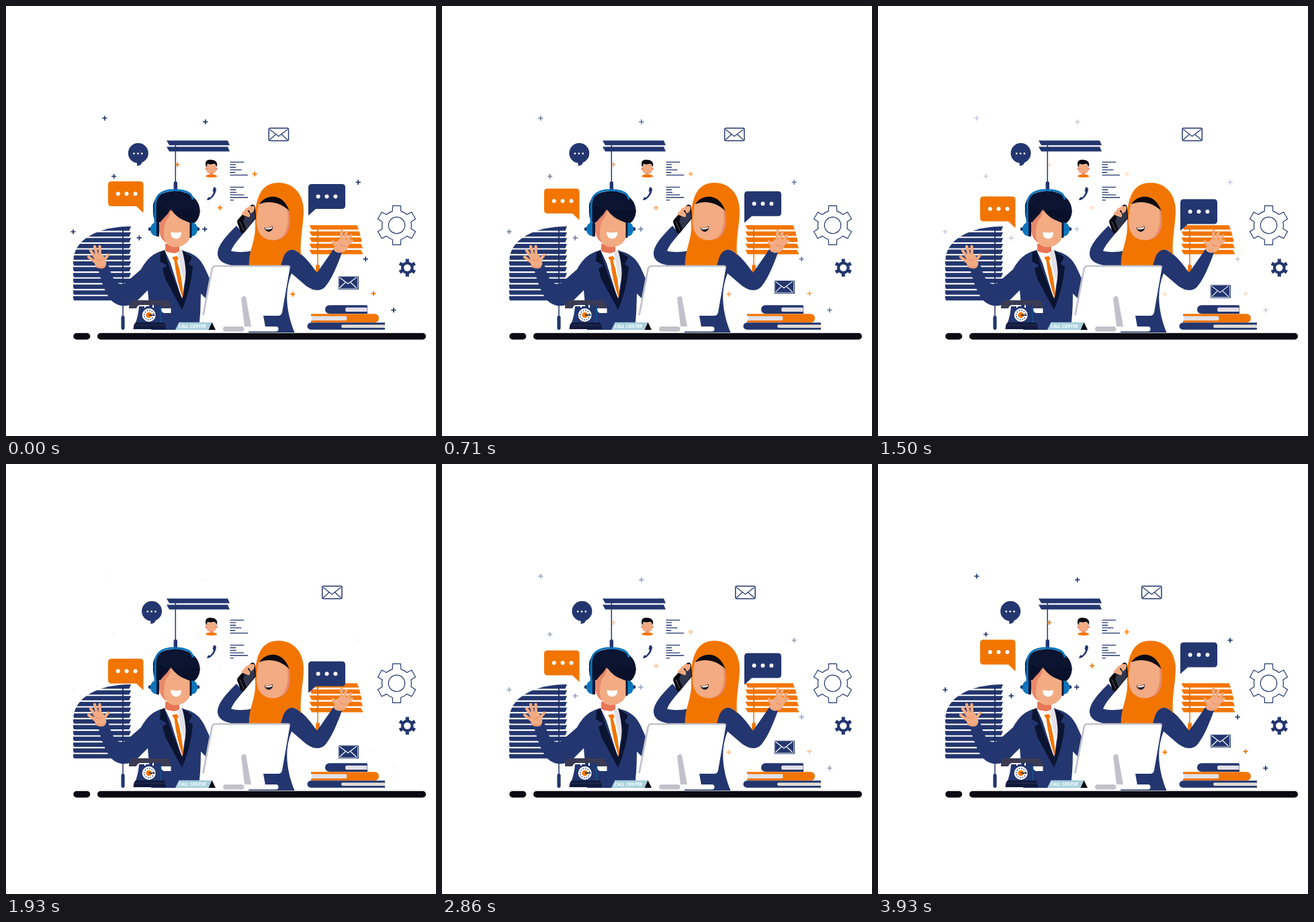
Write an HTML page that moves like this. It is 640x640 px and loops after 4 s.

```html
<!DOCTYPE html>
<html lang="en">
<head>
<meta charset="utf-8">
<title>Call center</title>
<style>
  html, body { margin: 0; width: 100%; height: 100%; overflow: hidden; background: #fff; }
  svg { display: block; width: 100vw; height: 100vh; }
  .navy { fill: #23366f; }
  .orange { fill: #f27501; }
  .skin { fill: #f2ab82; }
  .shade { fill: #e8886b; }
  .dark { fill: #0b1430; }
  .black { fill: #0b0911; }
  .blue { fill: #0c75bc; }
  .grey { fill: #c2c1cb; }
  .page { fill: #e2e0e8; }
  .white { fill: #fff; }
  .line { fill: none; stroke: #23366f; stroke-linecap: round; stroke-linejoin: round; }
  .finger { fill: none; stroke: #f2ab82; stroke-width: 4.4; stroke-linecap: round; stroke-linejoin: round; }
  .sign { font: italic 700 7px "Open Sans", sans-serif; fill: #fff; letter-spacing: -.15px; }
</style>
</head>
<body>
<svg viewBox="0 0 640 640">
  <defs>
    <clipPath id="arch"><path d="M187 328C139 328 100 346 100 381V439H187Z"/></clipPath>
    <clipPath id="curve"><path d="M450 325H522Q531 345 531 370H450Z"/></clipPath>
  </defs>

  <!-- blinds -->
  <g class="navy">
    <path id="left-blind" clip-path="url(#arch)"/>
    <path d="M239 200.3H330L333 207.3H243ZM239 209.5H330L333 216.5H243Z"/>
    <rect x="249.6" y="261" width="5.4" height="18" rx="2.6"/>
    <rect x="171.4" y="461" width="5.2" height="21" rx="2.4"/>
  </g>
  <path d="M174 330V463M252.3 207V264" class="line" stroke-width="1.5"/>
  <path d="M174 330V438" stroke="#192856"/>
  <path id="right-blind" class="orange" clip-path="url(#curve)"/>
  <path d="M464 332V388" stroke="#f27501" stroke-width="1.5"/>
  <path d="M464 332V369" stroke="#d96800"/>
  <rect x="461.2" y="385" width="5.8" height="13" rx="2.4" class="orange"/>

  <!-- contact card -->
  <path class="skin" d="M298 236H313V243C313 248 309 250 305.500 250S298 248 298 243Z"/>
  <circle cx="298" cy="242.500" r="1.500" class="shade"/><circle cx="313.300" cy="242.500" r="1.500" class="shade"/>
  <path class="shade" d="M303 249H308V253H303Z"/>
  <path class="orange" d="M297 254Q298 251 302.500 250.700Q305.500 253 308.500 250.700Q313 251 314.500 254Q306 256.500 297 254Z"/>
  <path class="black" d="M298 240C295 231 299 228 306 229C312 229 316 233 313.500 240Q313 236 310 235Q303 236.500 300 235Q299 237 298 240Z"/>
  <path class="navy" d="M309 270Q312 269 313 273Q312 281 305 287Q301 290 299 288.500L301 284.500L304 285Q308 281 309 277L307.500 275Z"/>
  <path id="list" class="line" stroke-width="1.35" style="stroke-linecap:butt"/>

  <!-- gears -->
  <path id="big-gear" class="line" stroke-width="1.2"/>
  <circle cx="581.500" cy="326.400" r="12.200" class="line" stroke-width="1.2"/>
  <path id="small-gear" class="navy"/>
  <circle cx="597.300" cy="389.600" r="5.200" class="white"/>

  <!-- drifting icons -->
  <g id="mail" class="line" stroke-width="1.5">
    <rect x="391.200" y="181.800" width="29.300" height="18.600" rx="2"/>
    <path stroke-width="1.2" d="M393 184L405.800 194L418.600 184M393 198.800L401.500 191M418.600 198.800L410 191"/>
  </g>
  <g id="chat">
    <circle cx="196.800" cy="219" r="15" class="navy"/>
    <path class="navy" d="M195 231V238Q203 237.500 203 229Z"/>
    <path d="M190.500 219.600h0M196.400 219.600h0M202.200 219.600h0" stroke="#fff" stroke-width="2.8" stroke-linecap="round"/>
  </g>
  <g id="boxes">
    <path class="orange" d="M157 261H199.500Q204.500 261 204.500 266V308L194 298H157Q152 298 152 293V266Q152 261 157 261Z"/>
    <path class="navy" d="M455 265H500Q505 265 505 270V297Q505 302 500 302H461L450 312V270Q450 265 455 265Z"/>
    <path d="M166.800 279.500h0M179.500 279.500h0M192.500 279.500h0M464.600 283.500h0M477.500 283.500h0M490.400 283.500h0" stroke="#fff" stroke-width="6" stroke-linecap="round"/>
  </g>
  <g id="note">
    <rect x="494.600" y="402" width="30.400" height="20" rx="1.500" class="navy"/>
    <rect x="495" y="402.300" width="28.500" height="18.400" rx="1.500" fill="none" stroke="#fff" stroke-width=".8"/>
    <path d="M496.500 404L509 413.500L521.500 404M496.500 419.500L505 411.500M521.500 419.500L513 411.500" fill="none" stroke="#fff" stroke-width="1.2"/>
  </g>

  <!-- woman -->
  <path class="navy" d="M343 327C330 340 314 356 315 370C316 380 325 384 340 387H372L365 364.500C355 366.500 344 367 335 364.500C338 356 347 346 353 339Z"/>
  <path class="navy" d="M405 384C410 368 416 362 424 362C437 363 451 380 463 397L488 361L500 367C494 384 484 409 474 419C466 426 455 423 446 416L425 398C414 425 417 455 429.500 486H361V470L390 400Z"/>
  <path class="orange" d="M405 263C430 263 443 282 443 305C443 325 437 347 439 371C433 362 424 360 417 367C411 373 412 381 408 388H362C360 366 372 350 371 325C370 300 373 263 405 263Z"/>
  <path class="shade" d="M376 295C390 285 410 290 421 303C426 325 422 347 400 348.500C381 348 372 336 373 315Z"/>
  <path class="skin" d="M376 295C390 286 410 290 418.500 302C422 325 418 348 397 348.500C380 348 372 336 373 315Z"/>
  <path class="black" d="M377 295C387 279 413 278 421.500 305C411 294 393 288 377 295Z"/>
  <path class="black" d="M384.500 329.500Q391 331.500 396.500 327.500Q398 335 391.500 336Q386 336 384.500 329.500Z"/>
  <path class="white" d="M385.500 329.900Q391 331.500 396 328.500L396 331Q391 333.500 386.300 332Z"/>
  <path class="black" d="M346 317L365 296Q369 294 371 299L372 316L354 338Q351 340 349 336L344 322Q343.500 319 346 317Z"/>
  <path fill="#30364e" d="M355 314L369 302L371 315L358 333L353 320Z"/>
  <path d="M348 321L354 334" stroke="#596078"/>
  <path class="finger" d="M353 309L357 305L361 310M358 303L363 301L365 306M363 300L368 300L367 304M355 310L361 312"/>
  <path class="skin" d="M490 357Q493 346 500 346Q510 347 510 355Q508 365 500 367Q490 369 487 361Z"/>
  <path class="finger" d="M499 350L499.500 335M503 350L506.500 337M506 353L513 342M507 356L514.500 349.500M492 358L486.500 350.500"/>
  <path d="M497 354Q500 359 506 357M493 364Q497 367 500 366" fill="none" stroke="#e8886b"/>

  <!-- man -->
  <path class="navy" d="M235 364C216 368 208 380 201 392L178 412C167 417 162 410 157 400L152 384L137 391C142 411 149 432 160 441C170 449 186 447 194 440L211 423L216 482H287Q290 455 290 428L298 436L306 412L295 388C288 375 280 368 262 364Z"/>
  <path class="skin" d="M131 373Q137 366 144 370L149 379Q150 387 146 390Q138 392 133 388Z"/>
  <path class="finger" d="M134 382L123 373.500M134 376L126 364M136 373L132 358M140 373L139.500 358M146 378L152 370.500"/>
  <path d="M132 386Q139 392 147 387M134 377Q140 381 144 376" fill="none" stroke="#e8886b"/>

  <path class="white" d="M236 363H264L269 390L262 437L245 383Z"/>
  <path class="page" d="M256 368L262 362Q270 381 266 412L260 390Z"/>
  <path fill="#e77657" d="M237 354H258V365Q249 371 237 365Z"/>
  <path class="white" d="M236 364Q240 367 248 367.500L251 371L244 378Z"/>
  <path class="orange" d="M247 374L254 372L257 376L254.500 379Q263 405 264 437Q254 411 250.500 379Z"/>
  <path class="dark" d="M230 366L236 363Q241 388 262.500 436L262 452L237 406L233 391L240 386L229 380Z"/>
  <path class="dark" d="M262 363L277 374L272 384L278 388Q275 422 262 452L262.500 436Q273 401 262 363Z"/>

  <path class="dark" d="M219 302C217 285 233 275 253 275.500C275 276 290 290 288.500 307C287 318 281 324 276 324V344H272L230 322L222 321Q218 312 219 302Z"/>
  <path class="shade" d="M228 324L245 302L262 340L243 354C231 351 228 340 228 331Z"/>
  <path class="skin" d="M234 324Q242 317 246 303Q255 318 275.500 322V336C275 352 263 359 251 359C239 358 234 348 234 335Z"/>
  <path class="dark" d="M245 302Q257 318 279 324Q289 316 288.500 304Q285 290 270 288L240 287Q235 300 238 317Z"/>
  <path class="shade" d="M228 330Q229 320 239 311L245 303Q246 312 238 320Q234 331 235 348Q228 342 228 330Z"/>
  <path fill="#060b20" d="M226 297Q246 309 262 303Q279 301 288 307Q286 321 278 324Q257 318 245 302Q240 314 228 322Z" opacity=".4"/>
  <path class="white" d="M245 336.500Q253 338 261 336.500Q261 346.500 253 346.500Q245.500 346 245 336.500Z"/>
  <path d="M222 326V297C222 281 233 274 250 274C266 274 277 278 278 288" fill="none" stroke="#0c75bc" stroke-width="3"/>
  <circle cx="214.500" cy="332" r="2.800" class="navy"/>
  <circle cx="285.500" cy="332" r="2.800" class="navy"/>
  <path class="blue" d="M228 321V343Q215 343 215 332Q215 322 228 321ZM276 322V343Q285 342 285 332Q285 323 276 322Z"/>
  <path class="dark" d="M224 321H228V343H224ZM273.500 322H276.300V345H273.500Z"/>

  <!-- monitor -->
  <path class="white" d="M309 387H420Q423 387 422.500 390L411 456Q410 461 405 461H383L386 478H352L350 461H293Z"/>
  <path d="M293.500 460L306.500 392Q307.500 387 312 387H419.500Q422 387 422 389.500" fill="none" stroke="#c2c1cb" stroke-width="2.700"/>
  <path class="grey" d="M350 435Q353 430.500 357 433L365 477H355Z"/>
  <rect x="352" y="477" width="53.500" height="7.600" rx="3.800" class="white"/>
  <rect x="323" y="477" width="31.500" height="7.600" rx="3.800" class="grey"/>

  <!-- telephone -->
  <path class="navy" d="M198 447H228Q229 464 237 474H192Q197 461 198 447Z"/>
  <path d="M230 449Q229 461 231 473" fill="none" stroke="#174f86" stroke-width="2"/>
  <path d="M207 444V449M219 444V449" stroke="#fff" stroke-width="2"/>
  <path fill="#3a3b53" d="M188 438H240Q245 439 245 450H232Q232 446 228 445H200Q196 445 194 450H183Q183 440 188 438Z"/>
  <path class="white" d="M231 450H245.500V457H235Q231 456 231 450Z"/>
  <path fill="#111a3c" d="M193 471H235Q238 474 238 481H189.500Q190 473 193 471Z"/>
  <path d="M192 475H237" stroke="#2b355c"/>
  <circle cx="212.700" cy="460" r="10" class="white"/>
  <circle cx="212.700" cy="460" r="7" fill="none" stroke="#23366f" stroke-width="1.500" stroke-dasharray="1.500 2.200"/>
  <circle cx="212.700" cy="460" r="4.300" class="orange"/>
  <path d="M213 460H221.500" stroke="#0b1430" stroke-width="1.500"/>

  <!-- desk sign -->
  <path fill="#a8d0dc" d="M257.500 470.800H306.500L301.500 482H252Z"/>
  <path class="black" d="M306.500 470.800L312 482H301.500Z"/>
  <text x="256.500" y="479" class="sign">CALL CENTER</text>

  <!-- books and desk -->
  <path class="navy" d="M481 445.300H536Q538 445.300 538 447.300V458H481Q475 457 475 451.700T481 445.300Z"/>
  <path class="page" d="M507 448.800H537.500V455H507Q505 455 505 452T507 448.800Z"/>
  <path class="orange" d="M454 458.300H549Q555 459 555 464.800T549 471.300H454V468.300H457V461.600H454Z"/>
  <path class="page" d="M455 461.600H505Q507.500 461.600 507.500 464.800T505 468H455Z"/>
  <path class="navy" d="M454 471.300H564V481.800H454Q448.500 481 448.500 476.500T454 471.300Z"/>
  <path fill="#dfddd5" d="M501 474.300H564V479H501Q499 479 499 476.600T501 474.300Z"/>
  <rect x="100.300" y="486.800" width="25" height="9.700" rx="4.800" class="black"/>
  <rect x="136" y="486.800" width="489" height="9.700" rx="4.800" class="black"/>

  <g id="sparks" stroke-width="1.7">
    <path id="navy-sparks" stroke="#23366f"/>
    <path id="orange-sparks" stroke="#f27501"/>
  </g>
</svg>
<script>
  const $ = id => document.getElementById(id);
  const draw = (id, d) => $(id).setAttribute('d', d);

  const slats = (count, top, step, slat) =>
    Array.from({ length: count }, (_, i) => slat(top + i * step)).join('');
  draw('left-blind', slats(13, 328, 8.65, y => `M99 ${y}H186L183.500 ${y + 6.5}H101Z`));
  draw('right-blind', slats(5, 326.2, 9.2, y => `M451.500 ${y}H528L532 ${y + 6.6}H455Z`));

  const rows = (y, ends) => ends.map((x, i) => `M333.500 ${y + i * 3.85}H${x}`).join('');
  draw('list', rows(232.3, [354, 342, 342, 350.5, 341, 360]) +
               rows(269.6, [354, 342, 343, 354, 360, 339]));

  // Six teeth; each is a pair of inner and outer corners around its axis.
  function gear(cx, cy, inner, outer, root, tip) {
    let d = '';
    for (let i = 0; i < 6; i++) {
      const axis = i * Math.PI / 3 - Math.PI / 2;
      const at = (r, a) => `${cx + r * Math.cos(axis + a)} ${cy + r * Math.sin(axis + a)}`;
      d += `${i ? `A${inner} ${inner} 0 0 1 ` : 'M'}${at(inner, -root)}L${at(outer, -tip)}L${at(outer, tip)}L${at(inner, root)}`;
    }
    const a = -Math.PI / 2 - root;
    return d + `A${inner} ${inner} 0 0 1 ${cx + inner * Math.cos(a)} ${cy + inner * Math.sin(a)}Z`;
  }
  draw('big-gear', gear(581.5, 326.4, 22, 29.6, 0.29, 0.2));
  draw('small-gear', gear(597.3, 389.6, 9.3, 13.3, 0.27, 0.2));

  const crosses = points => points.map(([x, y]) => `M${x - 3.6} ${y}h7.2M${x} ${y - 3.6}v7.2`).join('');
  draw('navy-sparks', crosses([[146.8, 167], [296.8, 172.3], [160.6, 253.5], [100, 336],
    [198.3, 345.2], [295.8, 332.2], [524.2, 262.4], [535.2, 376.7], [576.9, 452.6]]));
  draw('orange-sparks', crosses([[255, 236], [370.2, 250], [318.6, 300.3], [426.9, 428.8], [547, 427.8]]));

  const LOOP = 4000, TICKS = 56, HALF = 27.75;
  const shift = (id, x, y) => $(id).setAttribute('transform', `translate(${x} ${y})`);

  // Everything swings out and back at constant speed, on a 14 fps beat.
  function render(now) {
    const tick = Math.floor((now % LOOP + 5) * TICKS / LOOP) % TICKS;
    const k = 1 - Math.abs(tick / HALF - 1);
    shift('mail', 81.7 * k, 0);
    shift('chat', 20.8 * k, 0);
    shift('boxes', 0, 29.6 * k);
    shift('note', 0, 17 * k);
    $('sparks').setAttribute('opacity', 1 - k);
  }

  let start;
  function loop(now) {
    start ??= now;
    render(now - start);
    requestAnimationFrame(loop);
  }
  render(0);
  requestAnimationFrame(loop);
</script>
</body>
</html>
```
